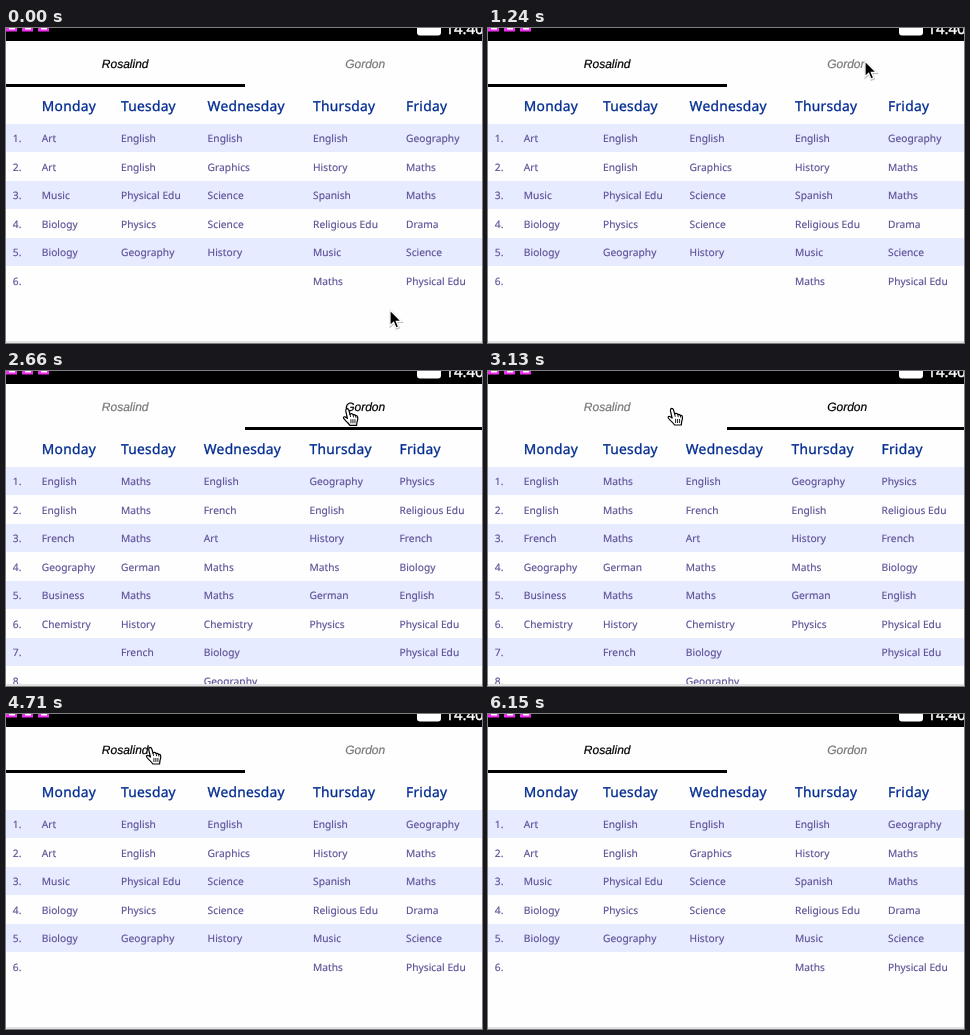
An HTML page that plays this animation: 476 by 315 pixels, repeating every 6240 ms.

```html
<!DOCTYPE html>
<html lang="en">
<head>
<meta charset="utf-8">
<title>Timetable tabs</title>
<style>
  html, body { margin: 0; width: 100%; height: 100%; overflow: hidden; background: #fff; }
  svg { display: block; width: 476px; height: 315px; text-rendering: geometricPrecision; }
  .cell, .head, .clock { font-family: "Noto Sans", "Open Sans", sans-serif; }
  .cell { font-size: 10.2px; letter-spacing: .04px; fill: #5c4f96; stroke: #5c4f96; stroke-width: .15px; }
  .head { font-size: 13.8px; letter-spacing: .25px; fill: #002b90; stroke: #002b90; stroke-width: .3px; }
  .clock { font-size: 15px; fill: #fff; stroke: #fff; stroke-width: .4px; }
  .tab { font: italic 12px "Liberation Sans", Arial, sans-serif; text-anchor: middle; stroke-width: .2px; }
</style>
</head>
<body>
<svg viewBox="0 0 476 315">
  <defs><clipPath id="page"><rect width="476" height="313"/></clipPath></defs>
  <rect width="476" height="315" fill="#fefefe"/>
  <g id="tables" clip-path="url(#page)"></g>
  <rect y="313" width="476" height="2" fill="#e2e2e2"/>
  <rect width="476" height="13"/>
  <g id="signal"></g>
  <rect x="411" y="-8" width="24" height="15.5" rx="3" fill="#fff"/>
  <text class="clock" x="439.3" y="6">14.40</text>
  <text class="tab" x="119.2" y="40">Rosalind</text>
  <text class="tab" x="359.2" y="40">Gordon</text>
  <rect id="bar" y="56" width="239" height="3"/>
  <g id="arrow">
    <path d="M0 0V15.6L3.6 12.3L6 18L8.7 16.9L6.3 11.4H11.2Z" transform="translate(.4 .8)" opacity=".25" stroke="#000" stroke-width="1.8"/>
    <path d="M0 0V15.6L3.6 12.3L6 18L8.7 16.9L6.3 11.4H11.2Z" stroke="#fff" stroke-width="1.2"/>
  </g>
  <g id="hand" stroke="#000" stroke-linejoin="round" stroke-linecap="round">
    <path fill="#fff" stroke-width="1.2" d="M-.6 10L-2.3 2.6Q-2.4 .5 -1 .4Q.4 .4 .8 1.9L2 6.2Q2.6 5 4 5.5Q4.9 5.8 5.1 6.6Q6.7 5.8 7.6 7.4Q9.4 7 9.7 9Q10 11.2 9 13.4L8.6 17H1.9Q.2 14.6 -2.4 12.4Q-5 9.8 -4.5 8.9Q-3.4 7.6 -.6 10Z"/>
    <path fill="none" stroke-width=".9" d="M2 6.2L2.5 8.4M5.1 6.6L5.5 8.7M7.6 7.4L7.9 9.2M2.9 11.3V14.6M4.9 11.3V14.6M6.9 11.3V14.6"/>
  </g>
</svg>
<script>
const LOOP = 6240;
const OPEN_SECOND = 1960, OPEN_FIRST = 4490;
const BAR_FRAMES = [1960, 2020, 2070, 2130, 4490, 4550, 4600, 4660, 4710];
const days = ["Monday", "Tuesday", "Wednesday", "Thursday", "Friday"];

const schedules = [
  { cols: [35.8, 115, 201.6, 307, 400], rows: [
    "Art,English,English,English,Geography",
    "Art,English,Graphics,History,Maths",
    "Music,Physical Edu,Science,Spanish,Maths",
    "Biology,Physics,Science,Religious Edu,Drama",
    "Biology,Geography,History,Music,Science",
    ",,,Maths,Physical Edu"
  ] },
  { cols: [35.8, 115, 197.8, 303.5, 393.5], rows: [
    "English,Maths,English,Geography,Physics",
    "English,Maths,French,English,Religious Edu",
    "French,Maths,Art,History,French",
    "Geography,German,Maths,Maths,Biology",
    "Business,Maths,Maths,German,English",
    "Chemistry,History,Chemistry,Physics,Physical Edu",
    ",French,Biology,,Physical Edu",
    ",,Geography,,"
  ] }
];

// Pointer moves: first step, last step, number of steps, end point, bend, easing power
const moves = [
  { t0: 540, t1: 1130, n: 11, to: [374, 73], bend: [-4, 0], pow: 1 },
  { t0: 1180, t1: 1240, n: 2, to: [377, 33], bend: [0, 0], pow: 1.4 },
  { t0: 2550, t1: 3130, n: 11, to: [184.7, 37], bend: [0, 6], pow: 1 },
  { t0: 3180, t1: 3410, n: 5, to: [147, 34], bend: [0, 0], pow: 1.6 },
  { t0: 4310, t1: 4370, n: 2, to: [145, 33], bend: [0, 0], pow: 1 },
  { t0: 5070, t1: 5620, n: 11, to: [453, 310], bend: [0, 0], pow: 1.5 },
  { t0: 5740, t1: 5790, n: 2, to: [456, 320], bend: [0, 0], pow: 1 }
];

const $ = id => document.getElementById(id);

function add(parent, name, attrs, text) {
  const el = document.createElementNS("http://www.w3.org/2000/svg", name);
  for (const key in attrs) el.setAttribute(key, attrs[key]);
  if (text) el.textContent = text;
  parent.appendChild(el);
  return el;
}

function buildTable({ cols, rows }) {
  const g = add($("tables"), "g", {});
  rows.forEach((row, i) => {
    const top = 96 + 28.5 * i, y = Math.round(top + 18.2);
    if (i % 2 === 0) add(g, "rect", { x: 0, y: top, width: 476, height: 28, fill: "#e7ebff" });
    add(g, "text", { class: "cell", x: 6.8, y }, i + 1 + ".");
    row.split(",").forEach((subject, c) => {
      if (subject) add(g, "text", { class: "cell", x: cols[c], y }, subject);
    });
  });
  days.forEach((day, c) => add(g, "text", { class: "head", x: cols[c], y: 83 }, day));
  return g;
}

const tables = schedules.map(buildTable);
const tabs = document.querySelectorAll(".tab");

for (const x of [0, 16, 32]) {
  add($("signal"), "rect", { x, y: 0, width: 11, height: 3.5, fill: "#f02cf0" });
  add($("signal"), "rect", { x: x + 3, y: 0, width: 6, height: 1.5, fill: "#fff" });
}

function pointerAt(t) {
  let pos = [384, 282];
  for (const { t0, t1, n, to, bend, pow } of moves) {
    if (t < t0) break;
    const step = Math.min(n, Math.floor((t - t0) / (t1 - t0) * (n - 1) + 1e-6) + 1);
    const p = 1 - (1 - step / n) ** pow;
    pos = pos.map((from, i) => from + (to[i] - from) * p + bend[i] * 4 * p * (1 - p));
  }
  return pos;
}

function barAt(t) {
  const shown = BAR_FRAMES.filter(f => f <= t).pop() || 0;
  const swing = start => {
    const p = Math.min(1, Math.max(0, (shown - start) / 200));
    return .5 - Math.cos(Math.PI * p) / 2;
  };
  return Math.round(239 * (swing(1926) - swing(4480)));
}

function draw(t) {
  const open = t >= OPEN_SECOND && t < OPEN_FIRST ? 1 : 0;
  tables.forEach((g, i) => g.setAttribute("display", i === open ? "inline" : "none"));
  tabs.forEach((tab, i) => {
    const color = i === open ? "#000" : "#777";
    tab.setAttribute("fill", color);
    tab.setAttribute("stroke", color);
  });
  $("bar").setAttribute("x", barAt(t));

  const [x, y] = pointerAt(t);
  const isHand = t >= OPEN_SECOND && y < 59;
  for (const id of ["arrow", "hand"]) {
    $(id).setAttribute("transform", `translate(${x} ${y})`);
    $(id).setAttribute("display", (id === "hand") === isHand ? "inline" : "none");
  }
}

const begin = performance.now();
function tick() {
  draw((performance.now() - begin) % LOOP);
  requestAnimationFrame(tick);
}
tick();
</script>
</body>
</html>
```
